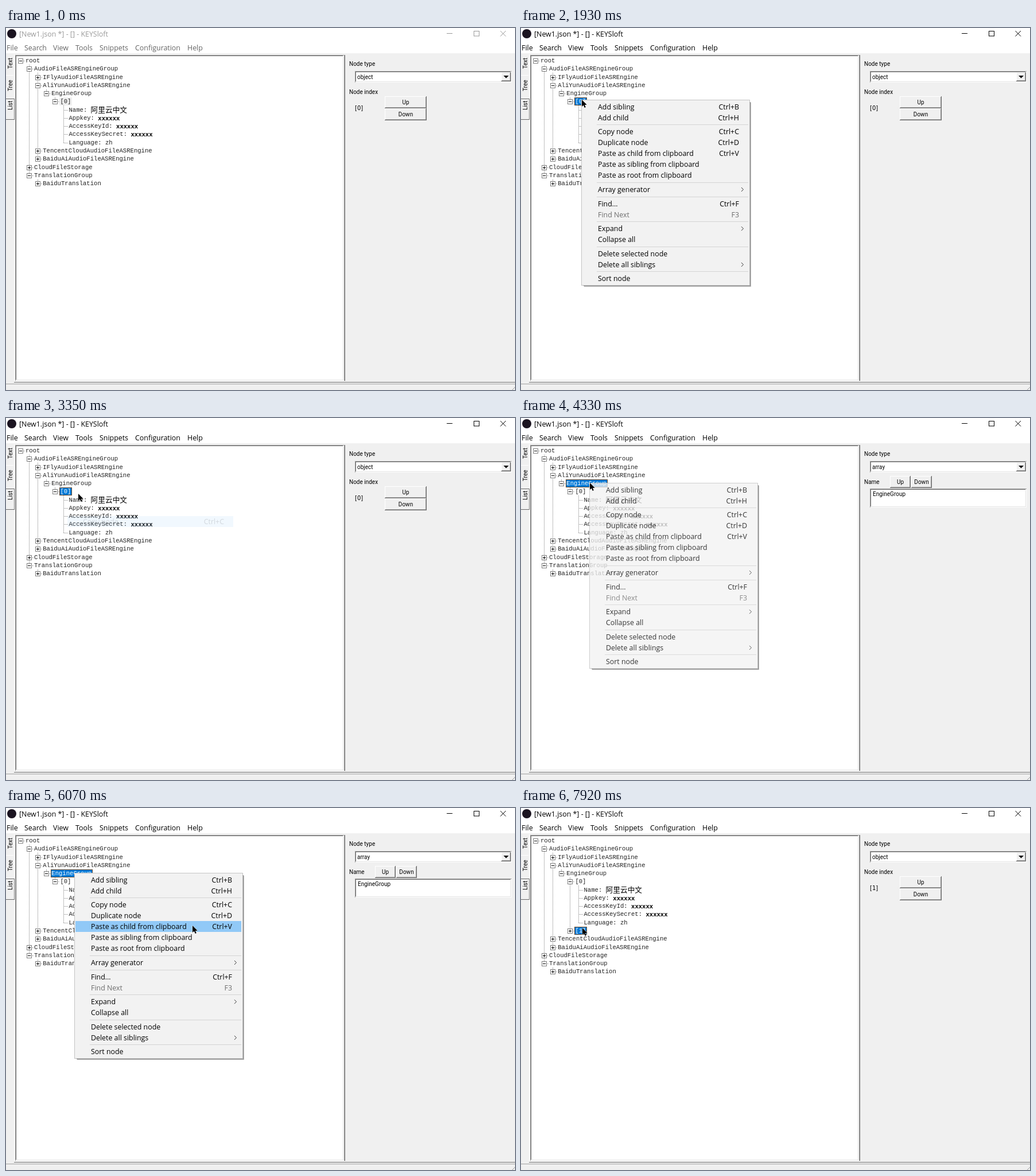
An HTML page with a canvas that plays this animation: 887x631 px, repeating every 8 s.

```html
<!DOCTYPE html>
<html>
<head>
<meta charset="utf-8">
<style>
html, body { margin: 0; width: 887px; height: 631px; overflow: hidden; background: #f0f0f0; }
canvas { display: block; }
</style>
</head>
<body>
<canvas id="stage" width="887" height="631"></canvas>
<script>
const c = document.getElementById('stage').getContext('2d');
const UI = '12.4px "Open Sans", "Noto Sans", sans-serif';
const SMALL = '10px Roboto, sans-serif';
const WIDE = '10px "DejaVu Sans", sans-serif';
const MONO = '10.58px "Liberation Mono", monospace';
const CJK = '300 12.7px "Noto Sans CJK SC", "Noto Sans CJK", sans-serif';
const LOOP = 8000;

const PACE = [[100, 0], [950, 8], [1480, 13], [1930, 17], [2460, 22], [3010, 27], [3670, 33],
  [3880, 35], [4430, 40], [4860, 44], [5190, 47], [6070, 55], [7260, 66], [7920, 72], [8100, 73.6]];
// Pointer path: tick, x, y
const PATH = [[0, 8, 222], [3, 52, 174], [6, 104, 128], [7, 106, 125], [21, 106, 125], [25, 167, 179],
  [28, 167, 179], [30, 126, 132], [31, 121, 118], [32, 120, 113], [41, 120, 113], [42, 140, 142],
  [44, 205, 204], [46, 205, 204], [54, 322, 204], [55, 325, 205], [67, 325, 205], [69, 215, 206], [72, 107, 209]];
const CLICKS = [7, 27, 33, 34, 66];
const MENUS = [
  { x: 105, y: 125, open: 14, pick: 28, choice: 'Copy node' },
  { x: 119, y: 113, open: 37, pick: 67, choice: 'Paste as child from clipboard' }];
const FADE_IN = [0.25, 0.5, 0.78], FADE_OUT = [0.6, 0.36, 0.13];

const TREE = [
  [0, '-', 'root'], [1, '-', 'AudioFileASREngineGroup'], [2, '+', 'IFlyAudioFileASREngine'],
  [2, '-', 'AliYunAudioFileASREngine'], [3, '-', 'EngineGroup'], [4, '-', '[0]'],
  [5, '', 'Name: ', '阿里云中文'], [5, '', 'Appkey: ', 'xxxxxx'], [5, '', 'AccessKeyId: ', 'xxxxxx'],
  [5, '', 'AccessKeySecret: ', 'xxxxxx'], [5, '', 'Language: zh'],
  [2, '+', 'TencentCloudAudioFileASREngine'], [2, '+', 'BaiduAiAudioFileASREngine'],
  [1, '+', 'CloudFileStorage'], [1, '-', 'TranslationGroup'], [2, '+', 'BaiduTranslation']];
const PASTED = [...TREE.slice(0, 11), [4, '+', '[1]'], ...TREE.slice(11)];

// Label, shortcut ('>' opens a submenu); null is a separator
const ITEMS = [['Add sibling', 'Ctrl+B'], ['Add child', 'Ctrl+H'], null,
  ['Copy node', 'Ctrl+C'], ['Duplicate node', 'Ctrl+D'], ['Paste as child from clipboard', 'Ctrl+V'],
  ['Paste as sibling from clipboard'], ['Paste as root from clipboard'], null,
  ['Array generator', '>'], null, ['Find...', 'Ctrl+F'], ['Find Next', 'F3'], null,
  ['Expand', '>'], ['Collapse all'], null, ['Delete selected node'], ['Delete all siblings', '>'], null, ['Sort node']];

function rect(x, y, w, h, color) {
  c.fillStyle = color;
  c.fillRect(x, y, w, h);
}

function text(s, x, y, font, color = '#000', align = 'left') {
  c.font = font;
  c.fillStyle = color;
  c.textAlign = align;
  c.fillText(s, x, y);
}

function line(color, ...p) {
  c.strokeStyle = color;
  c.lineWidth = 1;
  c.beginPath();
  for (let i = 0; i < p.length; i += 2) c.lineTo(p[i], p[i + 1]);
  c.stroke();
}

function disc(x, y, r, color) {
  c.fillStyle = color;
  c.beginPath();
  c.arc(x, y, r, 0, 7);
  c.fill();
}

function lerpKeys(keys, t, col) {
  const i = keys.findIndex(k => k[0] > t);
  if (i < 0) return keys[keys.length - 1][col];
  const a = keys[Math.max(i - 1, 0)], b = keys[i];
  return a === b ? a[col] : a[col] + (b[col] - a[col]) * (t - a[0]) / (b[0] - a[0]);
}

function sunken(x, y, w, h) {
  rect(x, y, w, h, '#fff');
  rect(x, y, w, 1, '#a0a0a0');
  rect(x, y, 1, h, '#a0a0a0');
  rect(x + 1, y + 1, w - 2, 1, '#696969');
  rect(x + 1, y + 1, 1, h - 2, '#696969');
  rect(x + 1, y + h - 2, w - 2, 1, '#e3e3e3');
  rect(x + w - 2, y + 1, 1, h - 2, '#e3e3e3');
}

function button(x, y, w, h, label) {
  rect(x, y, w, h, '#696969');
  rect(x, y, w - 1, h - 1, '#fff');
  rect(x + 1, y + 1, w - 2, h - 2, '#a0a0a0');
  rect(x + 1, y + 1, w - 3, h - 3, '#f0f0f0');
  if (label) text(label, x + w / 2, y + h / 2 + 3.5, SMALL, '#000', 'center');
}

function drawWindow(active) {
  const ink = active ? '#000' : '#999', menuInk = active ? '#000' : '#666';
  rect(0, 0, 887, 631, '#f0f0f0');
  rect(0, 0, 887, 44, '#fff');
  disc(10, 10, 8, '#1b1420');
  text('[New1.json *] - [] - KEYSloft', 23, 14.5, UI, ink);
  line(ink, 768, 9.5, 778, 9.5);
  c.strokeRect(815.5, 5.5, 9, 8.5);
  line(ink, 861.5, 5, 871, 14.5);
  line(ink, 871, 5, 861.5, 14.5);
  [['File', 1], ['Search', 32], ['View', 82], ['Tools', 121], ['Snippets', 163],
    ['Configuration', 225], ['Help', 316]].forEach(([s, x]) => text(s, x, 39, UI, menuInk));

  [['Text', 71], ['Tree', 110], ['List', 143]].forEach(([s, y]) => {
    c.save();
    c.translate(10.5, y);
    c.rotate(-Math.PI / 2);
    text(s, 0, 0, SMALL);
    c.restore();
  });
  rect(0, 82, 13, 1, '#fff');
  rect(0, 123, 14, 1, '#696969');
  rect(0, 159, 14, 1, '#696969');
  rect(14, 45, 1, 572, '#fff');
  rect(14, 123, 1, 37, '#808080');

  sunken(16, 47, 573, 568);
  rect(589, 47, 1, 568, '#a0a0a0');
  rect(590, 47, 1, 568, '#696969');
  rect(14, 617, 873, 1, '#707070');
  rect(0, 620, 887, 1, '#a0a0a0');
  line('#a0a0a0', 882, 631, 887, 626);
}

function drawTree(rows, selected, active) {
  const px = l => 25 + 15 * l, py = i => 57 + 14.27 * i;
  c.setLineDash([1, 1]);
  rows.forEach(([l], i) => {
    const x = px(l) + 0.5, y = Math.round(py(i)) + 0.5;
    line('#808080', x, y, x + 8, y);
    if (!l) return;
    let p = i;
    while (rows[p][0] >= l) p--;
    line('#808080', x, Math.round(py(p)) + 7, x, y);
  });
  c.setLineDash([]);
  rows.forEach(([l, mark, label, value], i) => {
    const x = px(l), y = Math.round(py(i)), tx = 34 + 15.1 * l;
    if (mark) {
      rect(x - 4, y - 4, 9, 9, '#fff');
      c.strokeStyle = '#808080';
      c.strokeRect(x - 3.5, y - 3.5, 8, 8);
      rect(x - 2, y, 5, 1, '#000');
      if (mark === '+') rect(x, y - 2, 1, 5, '#000');
    }
    const on = label === selected;
    if (on) {
      const w = Math.round(label.length * 6.35) + 3, sx = Math.round(tx) - 1;
      rect(sx, y - 7, w, 14, active ? '#0078d7' : '#f0f0f0');
      if (active) {
        c.strokeStyle = '#6b4a2c';
        c.strokeRect(sx + 0.5, y - 6.5, w - 1, 13);
      }
    }
    text(label, tx, y + 3, MONO, on && active ? '#fff' : '#222');
    if (value) text(value, tx + label.length * 6.35, y + 3.5, value[0] === 'x' ? 'bold ' + MONO : CJK);
  });
}

function drawPanel(index) {
  const array = index === null;
  text('Node type', 598, 66, SMALL);
  sunken(608, 75, 273, 20);
  text(array ? 'array' : 'object', 612, 89, SMALL);
  button(863, 77, 17, 16);
  c.fillStyle = '#000';
  c.beginPath();
  c.moveTo(867, 83);
  c.lineTo(876, 83);
  c.lineTo(871.5, 87.5);
  c.fill();
  text(array ? 'Name' : 'Node index', 598, 114.5, SMALL);
  if (array) {
    button(643, 101, 36, 21, 'Up');
    button(680, 101, 36, 21, 'Down');
    sunken(608, 123, 273, 33);
    text('EngineGroup', 613, 136, SMALL);
  } else {
    text(`[${index}]`, 608, 143, WIDE);
    button(660, 119, 73, 21, 'Up');
    button(660, 140, 73, 21, 'Down');
  }
}

function drawMenu({ x, y, open, pick, choice }, tick, mx, my) {
  if (tick < open || tick >= pick + FADE_OUT.length) return;
  const closing = tick >= pick;
  c.save();
  if (!closing) {
    // The shadow lies only beyond the right and bottom edges, and does not fade.
    rect(x + 294, y + 4, 1, 321, '#8c8c8c');
    rect(x + 295, y + 5, 1, 321, '#b8b8b8');
    rect(x + 4, y + 324, 291, 1, '#8c8c8c');
    rect(x + 5, y + 325, 291, 1, '#b8b8b8');
  }
  c.globalAlpha = closing ? FADE_OUT[tick - pick] : FADE_IN[tick - open] ?? 1;
  if (!closing) {
    rect(x, y, 294, 324, '#f2f2f2');
    c.strokeStyle = '#c4c4c4';
    c.lineWidth = 1;
    c.strokeRect(x + 0.5, y + 0.5, 293, 323);
  }
  let cy = y + 12;
  for (const item of ITEMS) {
    if (!item) {
      if (!closing) rect(x + 27, Math.round(cy - 7), 264, 1, '#d4d4d4');
      cy += 5.5;
      continue;
    }
    const [label, key] = item;
    const hover = closing ? label === choice : mx > x && Math.abs(my - cy) < 9.5;
    if (hover) rect(x + 2, Math.round(cy - 9.5), 289, 19, '#91c9f7');
    if (hover || !closing) {
      const ink = label === 'Find Next' ? '#6d6d6d' : '#000';
      text(label, x + 29, cy + 4.5, UI, ink);
      if (key === '>') line('#333', x + 279, cy - 3.5, x + 282.5, cy, x + 279, cy + 3.5);
      else if (key) text(key, x + 275, cy + 4.5, UI, ink, 'right');
    }
    cy += 19.07;
  }
  c.restore();
}

function drawPointer(x, y, clicked) {
  if (clicked) disc(x, y, 12, 'rgba(220,220,40,.72)');
  c.beginPath();
  [[0, 0], [0, 12], [2.8, 9.6], [4.8, 14], [6.8, 13], [4.9, 8.9], [8.7, 8.7]]
    .forEach(([dx, dy]) => c.lineTo(x + dx, y + dy));
  c.closePath();
  c.lineWidth = 1;
  c.strokeStyle = '#fff';
  c.stroke();
  c.fillStyle = '#000';
  c.fill();
}

function draw(ms) {
  const tick = ms < 100 ? -1 : Math.floor(lerpKeys(PACE, ms, 1) + 0.08);
  const x = lerpKeys(PATH, tick, 1), y = lerpKeys(PATH, tick, 2);
  const pasted = tick >= 67;
  drawWindow(tick >= 7);
  drawTree(pasted ? PASTED : TREE, pasted ? '[1]' : tick >= 33 ? 'EngineGroup' : '[0]', tick >= 13);
  drawPanel(pasted ? 1 : tick >= 35 ? null : 0);
  MENUS.forEach(m => drawMenu(m, tick, x, y));
  if (tick >= 0) drawPointer(x, y, CLICKS.includes(tick));
}

const start = performance.now();
(function loop() {
  draw((performance.now() - start) % LOOP);
  requestAnimationFrame(loop);
})();
</script>
</body>
</html>
```
